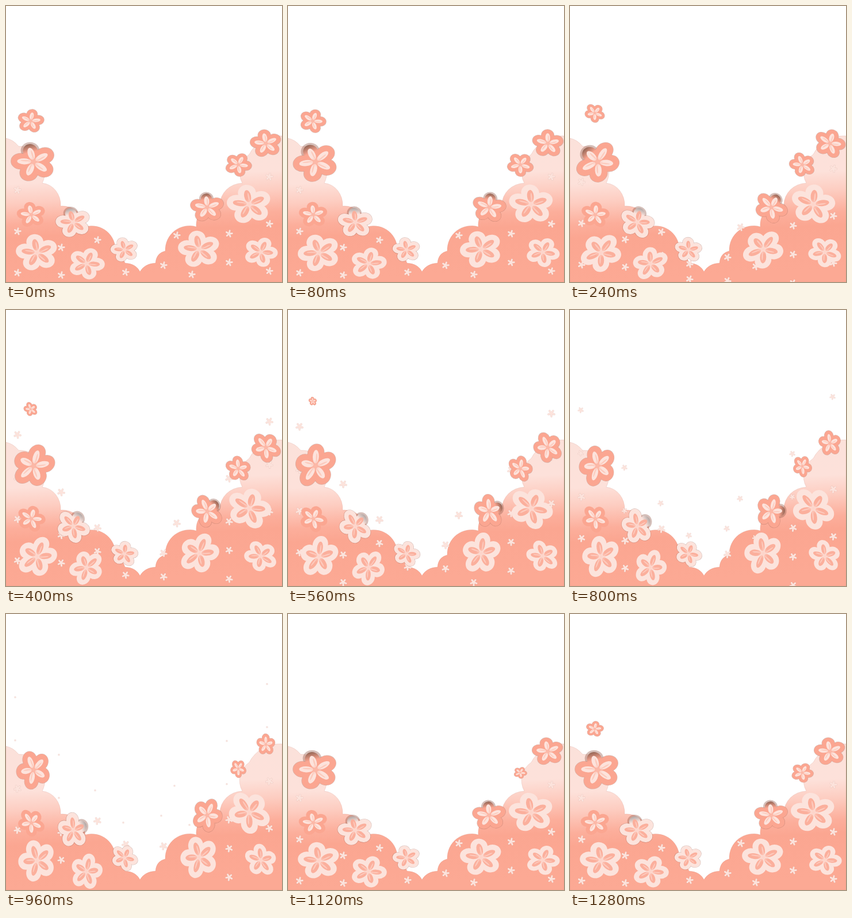
An HTML page with a canvas for the animation above (1360 ms loop, 480 px wide and 480 px high).

```html
<!DOCTYPE html>
<html lang="en">
<head>
<meta charset="utf-8">
<title>Drifting blossoms</title>
<style>
html, body { margin: 0; width: 100%; height: 100%; overflow: hidden; background: #fff; }
canvas { display: block; width: 480px; height: 480px; }
</style>
</head>
<body>
<canvas id="stage" width="480" height="480"></canvas>
<script>
const ctx = document.getElementById('stage').getContext('2d');
const LOOP = 1360, STEP = 80, RESET = 1120;
const CORAL = '#fba691', PALE = '#fce3dc';
const rad = Math.PI / 180;

const cloud = new Path2D(`M0 230 Q12 232 22 244 A44 44 0 0 1 63 308 A35 38 0 0 1 95 348
  A40 40 0 0 1 138 384 A41 41 0 0 1 190 427 A32 32 0 0 1 207 447 Q226 448 233 462
  Q241 448 260 447 Q261 430 277 426 A42 42 0 0 1 331 384 A35 35 0 0 1 372 346
  A40 38 0 0 1 411 308 A38 38 0 0 1 423 258 A60 60 0 0 1 480 226 V480 H0 Z`);
const sky = ctx.createLinearGradient(0, 226, 13, 480);
[[0, '#fbe1da'], [.33, '#fde1da'], [.46, '#fdcdc1'], [.61, '#fcae9b'], [.7, CORAL], [1, '#fca994']]
  .forEach(([p, c]) => sky.addColorStop(p, c));

// Progress from 0 to 1 between two times.
const ramp = (t, from, to) => Math.min(1, Math.max(0, (t - from) / (to - from)));
const riseAt = t => .088 * Math.max(0, t - 80) + .045 * Math.max(0, t - 720);
const angleAt = t => 83 * (1 - (1 - ramp(t, 0, 1040)) ** 1.6);

// turn: clockwise share of the common angle; base: direction of the first petal;
// wilt, from, regrow: how far and when it shrinks, and how much it grows back;
// shade: dark first petal, seen until the given time.
const flowers = [
  { x: 44, y: 363, r: 24, coral: 1, turn: .6 },
  { x: 54, y: 429, r: 35, turn: -1 },
  { x: 140, y: 448, r: 30, turn: -1, base: 68 },
  { x: 423, y: 345, r: 37, turn: .6 },
  { x: 336, y: 423, r: 35, turn: -1 },
  { x: 443, y: 428, r: 28, turn: .6, base: 140 },
  { x: 48, y: 271, r: 37, coral: 1, turn: -1, edge: 1, base: 105, wilt: .13, shade: '#8d6151', until: 240 },
  { x: 117, y: 376, r: 29, turn: 1, edge: 1, base: 104, shade: '#aaa19f', until: LOOP },
  { x: 206, y: 424, r: 23, turn: .5, edge: 1, base: 104 },
  { x: 350, y: 350, r: 28, coral: 1, turn: 1.25, edge: 1, base: 95, shade: '#8d6151', until: 800 },
  { x: 404, y: 276, r: 22, coral: 1, turn: 1, edge: 1, base: 136, wilt: .32, lift: 7, regrow: .5 },
  { x: 452, y: 239, r: 26, coral: 1, turn: 1, edge: 1, wilt: .32, lift: 12 },
  { x: 43, y: 200, r: 22, coral: 1, turn: 1, edge: 1, base: 80, wilt: 1, from: 80, lift: 62, regrow: 1 }
];

// Evenly spaced stars; the top one fades away, and a lead star flies ahead of it.
const columns = [
  { x: 20, top: 320, gap: 72, count: 3, lead: 1 },
  { x: 458, top: 297, gap: 82, count: 3, lead: 1 },
  { x: 96, top: 420, gap: 48, count: 3, lead: 1 },
  { x: 388, top: 396, gap: 50, count: 4, lead: 1 },
  { x: 159, top: 407, gap: 41, count: 2 },
  { x: 208, top: 463, gap: 26, count: 2 },
  { x: 274, top: 451, gap: 41, count: 2 },
  { x: 297, top: 399, gap: 0, count: 1 },
  { x: 323, top: 467, gap: 49, count: 2 }
];

function ellipse(x, y, rx, ry, fill) {
  ctx.beginPath();
  ctx.ellipse(x, y, rx, ry, 0, 0, 7);
  ctx.fillStyle = fill;
  ctx.fill();
}

function star(x, y, size, turn) {
  ctx.save();
  ctx.translate(x, y);
  ctx.rotate((turn + 12) * rad);
  ctx.beginPath();
  for (let i = 0; i < 5; i++) {
    ctx.moveTo(0, 0);
    ctx.lineTo(size * Math.sin(i * 72 * rad), -size * Math.cos(i * 72 * rad));
  }
  ctx.lineCap = 'round';
  ctx.strokeStyle = 'rgba(190,140,130,.3)';
  ctx.lineWidth = size * .56 + .7;
  ctx.stroke();
  ctx.strokeStyle = PALE;
  ctx.lineWidth = size * .56;
  ctx.stroke();
  ctx.restore();
}

function drawStars({ x, top, gap, count, lead }, phase, angle) {
  for (let i = lead && phase >= 320 ? -1 : 0; i < count; i++) {
    const fades = i <= 0;
    if (fades && phase >= 1040) continue;
    const fade = fades ? ramp(phase, 720, 960) : 0;
    const y = top + (i < 0 ? -75 : i * gap) - riseAt(phase) - 12 * fade;
    star(x - 4 * fade, y, 5.3 - 4.1 * fade, angle * .4);
  }
}

function drawFlower(flower, t, angle) {
  const { x, y, r, coral, turn, edge, base = 100, shade, until,
    wilt = 0, from = 560, lift = 0, regrow = 0 } = flower;
  const wilted = t < RESET ? ramp(t, from, from ? from + (wilt < 1 ? 400 : 720) : 0) : 0;
  const size = t < RESET ? 1 - wilt * wilted : 1 - regrow * (1 - ramp(t, RESET, LOOP));
  if (size <= 0) return;
  ctx.save();
  ctx.translate(x, y - lift * wilted);
  ctx.scale(size * r, size * r);
  ctx.rotate(turn * angle * rad);
  ctx.scale(1.06, .93);
  const outer = coral ? CORAL : PALE, inner = coral ? '#fde3dc' : '#fbaf9c';
  const petals = draw => {
    for (let i = 0; i < 5; i++) {
      ctx.save();
      ctx.rotate((i * 72 - base) * rad);
      draw(i);
      ctx.restore();
    }
  };
  if (edge) petals(() => ellipse(.58, 0, .42 + .6 / r, .4 + .6 / r, 'rgba(150,95,80,.4)'));
  petals(i => {
    let fill = outer;
    if (shade && i === 0 && (t <= until || t >= RESET)) {
      fill = ctx.createLinearGradient(.95, 0, .5, 0);
      fill.addColorStop(0, shade);
      fill.addColorStop(1, outer);
      ellipse(.54, 0, .38, .33, fill);
    } else ellipse(.58, 0, .42, .4, fill);
  });
  ellipse(0, 0, .4, .4, outer);
  petals(() => {
    ellipse(.42, 0, .31, .15, inner);
    ellipse(.36, .04, .22, .035, coral ? '#fccbbd' : '#fdc9bc');
  });
  const glow = ctx.createRadialGradient(0, 0, 0, 0, 0, .28);
  glow.addColorStop(0, coral ? '#fcb9a8' : '#fdd3c8');
  glow.addColorStop(1, 'rgba(253,205,193,0)');
  ellipse(0, 0, .28, .28, glow);
  ctx.restore();
}

function draw(t) {
  const phase = t >= RESET ? 0 : t, angle = angleAt(phase);
  ctx.clearRect(0, 0, 480, 480);
  ctx.fillStyle = sky;
  ctx.fill(cloud);
  ctx.strokeStyle = 'rgba(200,130,115,.3)';
  ctx.lineWidth = .7;
  ctx.stroke(cloud);
  for (const column of columns) drawStars(column, phase, angle);
  for (const flower of flowers) drawFlower(flower, t, angle);
}

const start = performance.now();
function tick() {
  const t = (performance.now() - start) % LOOP;
  draw(Math.floor(t / STEP) * STEP);
  requestAnimationFrame(tick);
}
tick();
</script>
</body>
</html>
```
